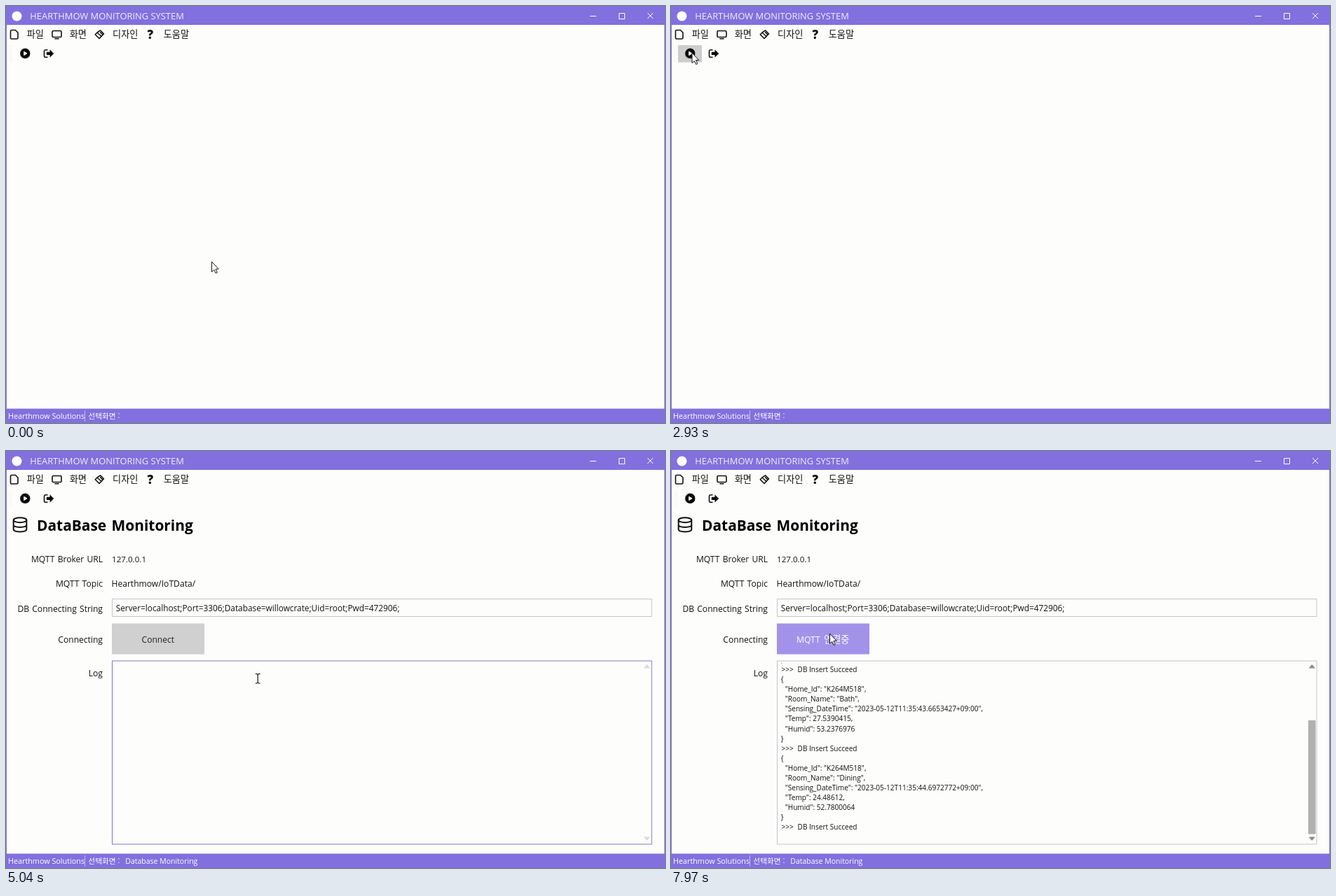
Recreate the animation shown at these times as an HTML page. Size 940 by 596 pixels, loop 8000 ms.

```html
<!DOCTYPE html>
<html lang="ko">
<head>
<meta charset="utf-8">
<title>Monitoring</title>
<style>
  html, body { margin: 0; width: 100%; height: 100%; overflow: hidden; background: #fdfdfc; }
  svg { display: block; width: 940px; height: 596px; }
  text { font-family: "Open Sans", "Noto Sans CJK KR", "Noto Sans CJK", "Noto Sans", sans-serif; font-size: 12.1px; fill: #111; }
  .ko { font-family: "Noto Sans CJK KR", "Noto Sans CJK", sans-serif; font-size: 13.2px; }
  .label { text-anchor: end; word-spacing: 1px; }
  .bar { fill: #fff; font-size: 10.5px; }
  .log text { font-size: 10.07px; }
  .line { fill: none; stroke: #111; stroke-width: 1.6; stroke-linejoin: round; stroke-linecap: round; }
  .thin { fill: none; stroke: #fff; stroke-width: 1; }
</style>
</head>
<body>
<svg viewBox="0 0 940 596">
  <defs>
    <clipPath id="logClip"><rect x="152" y="303.5" width="756" height="257.5"/></clipPath>
  </defs>
  <rect width="940" height="596" fill="#fdfdfc"/>
  <path d="M.5 0V596M939.5 0V596" stroke="#8270de"/>

  <rect width="940" height="27" fill="#8270de"/>
  <circle cx="15.5" cy="14.5" r="7" fill="#fff"/>
  <text x="34.3" y="19.2" style="font-size:12.9px;fill:#f1eefc">HEARTHMOW MONITORING SYSTEM</text>
  <path class="thin" d="M833 14.5h9M874.5 10.5h8v8h-8ZM915 10l8 8M923 10l-8 8"/>

  <g class="line">
    <path d="M8 34.5h5.5l3.5 3.5v7a2 2 0 0 1-2 2H8a1.5 1.5 0 0 1-1.5-1.5V36A1.5 1.5 0 0 1 8 34.5Z"/>
    <path d="M67.5 35.5h10a1.5 1.5 0 0 1 1.5 1.5v6a1.5 1.5 0 0 1-1.5 1.5h-10a1.5 1.5 0 0 1-1.5-1.5v-6a1.5 1.5 0 0 1 1.5-1.5ZM70 46.7h5"/>
    <path d="M134.5 34.8L139.5 39.8L133 46.5L127.3 40.8L130 38ZM130 38L136.3 43.5M134.5 37.5l2.6 2.6"/>
  </g>
  <text x="201.5" y="46.5" style="font-size:17px;font-weight:800">?</text>
  <text class="ko" x="29.7" y="45">파일</text>
  <text class="ko" x="90.7" y="45">화면</text>
  <text class="ko" x="152" y="45">디자인</text>
  <text class="ko" x="224.7" y="45">도움말</text>

  <path d="M5.5 57V80M8 58V80" stroke="#e4e4e0" stroke-dasharray="1 2"/>
  <rect id="toolHover" x="10" y="56" width="34" height="24.5" fill="#cdcdcd"/>
  <circle cx="27.3" cy="67.8" r="7.2" fill="#080808"/>
  <path d="M25.7 65.2L30 67.8L25.7 70.4Z" fill="#fff" stroke="#fff" stroke-linejoin="round"/>
  <path class="line" d="M59 62.7h-2.5a2 2 0 0 0-2 2v6.5a2 2 0 0 0 2 2H59"/>
  <path d="M57.8 65.7h4.7v-3.4l5.7 5.6l-5.7 5.6v-3.4h-4.7Z" fill="#080808"/>

  <g id="view">
    <g class="line" style="stroke-width:2">
      <ellipse cx="20" cy="98.7" rx="9.3" ry="3.5"/>
      <path d="M10.7 98.7V112C10.7 116.5 29.3 116.5 29.3 112V98.7M10.7 105.5C10.7 110 29.3 110 29.3 105.5"/>
    </g>
    <text x="44" y="114" style="font-size:20.9px;font-weight:700;word-spacing:2px;fill:#000">DataBase Monitoring</text>
    <text class="label" x="138" y="159">MQTT Broker URL</text>
    <text class="label" x="138" y="194.2">MQTT Topic</text>
    <text class="label" x="138" y="229.5">DB Connecting String</text>
    <text class="label" x="138" y="273.7">Connecting</text>
    <text class="label" x="138" y="321.7">Log</text>
    <text x="151" y="159" style="font-size:11.6px">127.0.0.1</text>
    <text x="150.5" y="194.2">Hearthmow/IoTData/</text>
    <rect x="151.5" y="211.5" width="769.5" height="25" fill="none" stroke="#c6c5cc"/>
    <text x="156.7" y="228.7" style="font-size:11.84px">Server=localhost;Port=3306;Database=willowcrate;Uid=root;Pwd=472906;</text>
    <rect id="button" x="151" y="246.5" width="132" height="44"/>
    <text id="connect" x="193.5" y="273.7">Connect</text>
    <g id="linked">
      <text x="179" y="273.7" style="fill:#fff">MQTT</text>
      <text class="ko" x="218" y="274" style="fill:#fff">연결중</text>
    </g>
    <rect id="logBox" x="151.5" y="300" width="769.5" height="262" fill="none"/>
    <g clip-path="url(#logClip)"><g id="log" class="log"></g></g>
    <rect id="thumb" x="909" y="385" width="10.5" height="162.5" fill="#b0b0b0"/>
    <path id="arrows" d="M909.5 310.5L914.3 305L919 310.5ZM909.5 551.5L914.3 557L919 551.5Z"/>
  </g>

  <rect y="575.5" width="940" height="20.5" fill="#8270de"/>
  <text class="bar" x="3" y="589.7" style="font-size:10.8px">Hearthmow Solutions</text>
  <path d="M112.5 578V594" stroke="#c3b9ee"/>
  <text class="bar ko" x="117.3" y="589.7" style="font-size:10.7px">선택화면 :</text>
  <text id="page" class="bar" x="170.3" y="589.7">Database Monitoring</text>

  <g id="cursor">
    <path id="arrow" d="M.5 .5V15L3.8 12L6.2 17L8.3 16L6 11H10.3Z" fill="#fff" stroke="#111" stroke-linejoin="round"/>
    <path id="beam" d="M-3 -6.5H-1L.5 -5.5L2 -6.5H4M.5 -5.5V6M-3 7H-1L.5 6L2 7H4" fill="none" stroke="#111" stroke-width="1.2"/>
  </g>
</svg>
<script>
const LOOP = 8000, PITCH = 14.06, SCROLL = 111.5;
const OPEN = 3130, PRESS = 5300, LINKED = 5500;
const $ = id => document.getElementById(id);
const show = (id, on) => $(id).setAttribute("visibility", on ? "inherit" : "hidden");
const paint = (id, name, value) => $(id).setAttribute(name, value);

// time, x, y of the pointer
const path = [
  [30, 293, 365], [830, 465, 318], [860, 465, 318], [960, 479, 303],
  [1260, 479, 303], [1300, 329, 281], [1530, 329, 281], [1670, 35, 96],
  [2170, 15, 36], [2530, 15, 36], [2670, 29.5, 66.5], [3700, 29.5, 66.5],
  [4230, 476, 382], [4830, 476, 382], [5270, 226, 260.5]
];

const records = [
  { at: 5770, room: "Living", sec: "42.6389332", temp: "27.6946087", humid: "62.0136223" },
  { at: 6760, room: "Bath", sec: "43.6653427", temp: "27.5390415", humid: "53.2376976" },
  { at: 7800, room: "Dining", sec: "44.6972772", temp: "24.48612", humid: "52.7800064" }
];

const lines = [{ at: LINKED, note: "MQTT Broker Connected" }];
for (const r of records) {
  const fields = [
    '"Home_Id": "K264M518",',
    `"Room_Name": "${r.room}",`,
    `"Sensing_DateTime": "2023-05-12T11:35:${r.sec}+09:00",`,
    `"Temp": ${r.temp},`,
    `"Humid": ${r.humid}`
  ];
  lines.push({ at: r.at, text: "{" });
  for (const text of fields) lines.push({ at: r.at, text, indent: 6 });
  lines.push({ at: r.at, text: "}" }, { at: r.at, note: "DB Insert Succeed" });
}

function add(parent, tag, attrs = {}, str = "") {
  const el = document.createElementNS("http://www.w3.org/2000/svg", tag);
  for (const name in attrs) el.setAttribute(name, attrs[name]);
  el.textContent = str;
  return parent.appendChild(el);
}

lines.forEach((line, i) => {
  const y = 315.2 + i * PITCH;
  line.el = add($("log"), "g");
  if (line.note) {
    add(line.el, "text", { x: 157.5, y }, ">>>");
    add(line.el, "text", { x: 180.6, y }, line.note);
  } else {
    add(line.el, "text", { x: 156.7 + (line.indent || 0), y }, line.text);
  }
});

function pointer(t) {
  const next = path.findIndex(p => p[0] > t);
  if (next === 0) return path[0].slice(1);
  if (next < 0) return path[path.length - 1].slice(1);
  const [t0, x0, y0] = path[next - 1], [t1, x1, y1] = path[next];
  const u = (t - t0) / (t1 - t0), e = u * u * (3 - 2 * u);
  return [x0 + (x1 - x0) * e, y0 + (y1 - y0) * e];
}

function draw(t) {
  const [x, y] = pointer(t);
  const inside = (l, top, r, b) => x >= l && x <= r && y >= top && y <= b;
  const open = t >= OPEN, linked = t >= LINKED, pressed = t >= PRESS && !linked;
  const inLog = open && inside(151, 300, 908, 562);
  const typing = inLog || (open && inside(151, 211, 921, 236));
  const scrolled = t >= records[2].at;

  show("view", open);
  show("page", open);
  show("toolHover", t >= 2870 && inside(10, 56, 44, 81));
  show("connect", !linked);
  show("linked", linked);
  const hover = inside(151, 247, 283, 291);
  paint("button", "fill", linked ? "#a392e9" : pressed ? "#333" : hover ? "#bdbdbd" : "#d0d0d0");
  $("connect").style.fill = pressed ? "#fff" : "#222";
  paint("logBox", "stroke", inLog ? "#8078c0" : "#c6c5cc");
  paint("arrows", "fill", scrolled ? "#8c8c8c" : "#dcdcdc");
  show("thumb", scrolled);
  for (const line of lines) line.el.setAttribute("visibility", t >= line.at ? "inherit" : "hidden");
  paint("log", "transform", `translate(0 ${scrolled ? -SCROLL : 0})`);

  paint("cursor", "transform", `translate(${x} ${y})`);
  show("arrow", !typing);
  show("beam", typing);
}

const start = performance.now();
function tick() {
  draw((performance.now() - start) % LOOP);
  requestAnimationFrame(tick);
}
tick();
</script>
</body>
</html>
```
